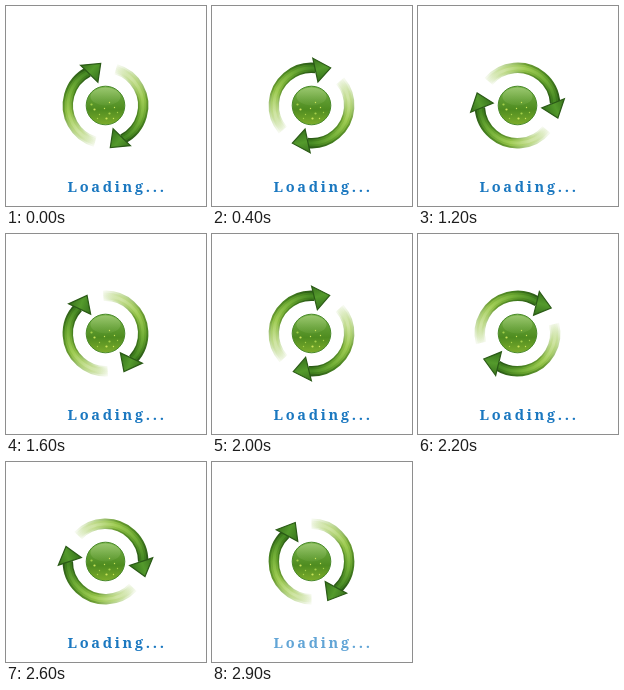
An HTML page with a canvas that plays this animation: 200x200 px, repeating every 3000 ms.

```html
<!DOCTYPE html>
<html>
<head>
<meta charset="utf-8">
<title>Loading</title>
<style>
html, body { margin: 0; width: 100%; height: 100%; overflow: hidden; background: #fff; }
canvas { display: block; }
</style>
</head>
<body>
<canvas id="stage" width="200" height="200"></canvas>
<script>
const ctx = document.getElementById('stage').getContext('2d');
const RAD = Math.PI / 180;
const LOOP = 3000, STEP = 100, EASE = .35;
const TAIL = 106 * RAD, NECK = 243 * RAD;
const SPAN = (NECK - TAIL) / (2 * Math.PI);

function withStops(gradient, stops) {
  for (const [at, color] of stops) gradient.addColorStop(at, color);
  return gradient;
}

// Colours run from the faded tail to the arrowhead; the seam lies clear of the stroke.
function sweep(...colors) {
  const stops = colors.map((color, i) => [SPAN * i / (colors.length - 1), color]);
  return withStops(ctx.createConicGradient(TAIL - .1, 0, 0), stops);
}

const bands = [
  [37.7, 10.4, sweep('#c5dc9a00', '#a9cc74b0', '#6b9c32', '#45801f', '#2b5a17')],
  [37.5, 7, sweep('#dcebc000', '#c2dc8e', '#8fbf45', '#64a02c', '#3c7a1c')],
  [37.5, 3, sweep('#e5f1d200', '#cfe4a4', '#a0cc55', '#74b038', '#478a24')]
];
const headFill = withStops(ctx.createLinearGradient(-26, -41, -6, -24),
  [[0, '#376f1c'], [.5, '#549a2c'], [1, '#33701a']]);
const ballFill = withStops(ctx.createLinearGradient(0, -20, 0, 20),
  [[0, '#7fb850'], [.35, '#5f9c31'], [.6, '#4f8c20'], [1, '#7fae2c']]);
const glossFill = withStops(ctx.createLinearGradient(0, -18, 0, 0),
  [[0, '#c0dd9a70'], [1, '#a5ce7a18']]);
const sparks = [[-11, 4], [-6, 9], [-1, 3], [4, 8], [9, 2], [12, 7], [1, 13], [-8, 13], [8, 13], [-14, -1], [4, -3]];

function arrow() {
  for (const [radius, width, color] of bands) {
    ctx.beginPath();
    ctx.arc(0, 0, radius, TAIL, NECK);
    ctx.lineWidth = width;
    ctx.strokeStyle = color;
    ctx.stroke();
  }
  ctx.beginPath();
  ctx.moveTo(-25, -40.2);
  ctx.lineTo(-4.8, -42);
  ctx.lineTo(-7.6, -23.2);
  ctx.closePath();
  ctx.fillStyle = headFill;
  ctx.fill();
  ctx.lineWidth = 1.2;
  ctx.strokeStyle = '#2a5a16';
  ctx.stroke();
}

function ball() {
  ctx.beginPath();
  ctx.arc(0, 0, 19.3, 0, 2 * Math.PI);
  ctx.fillStyle = ballFill;
  ctx.fill();
  ctx.lineWidth = 1;
  ctx.strokeStyle = '#4a8a2b';
  ctx.stroke();
  ctx.beginPath();
  ctx.ellipse(0, -9, 15, 9, 0, 0, 2 * Math.PI);
  ctx.fillStyle = glossFill;
  ctx.fill();
  sparks.forEach(([x, y], i) => {
    ctx.beginPath();
    ctx.arc(x, y, i % 3 ? .7 : 1.1, 0, 2 * Math.PI);
    ctx.fillStyle = i % 2 ? '#a5d04a' : '#cbe45c';
    ctx.fill();
  });
}

function draw(now) {
  const step = Math.floor(now % LOOP / STEP);
  const t = step * STEP / LOOP;
  const turn = 2 * Math.PI * t * (1 - EASE + EASE * t);

  ctx.fillStyle = '#fff';
  ctx.fillRect(0, 0, 200, 200);

  ctx.save();
  ctx.translate(99.5, 99.5);
  ctx.save();
  ctx.rotate(turn);
  arrow();
  ctx.rotate(Math.PI);
  arrow();
  ctx.restore();
  ball();
  ctx.restore();

  ctx.font = 'bold 14.5px "Noto Serif", serif';
  ctx.letterSpacing = '2.7px';
  ctx.fillStyle = step % 2 ? '#62a5d6' : '#1b78c0';
  ctx.fillText('Loading...', 61.5, 186);
}

const start = performance.now();
function tick() {
  draw(performance.now() - start);
  requestAnimationFrame(tick);
}
tick();
</script>
</body>
</html>
```
